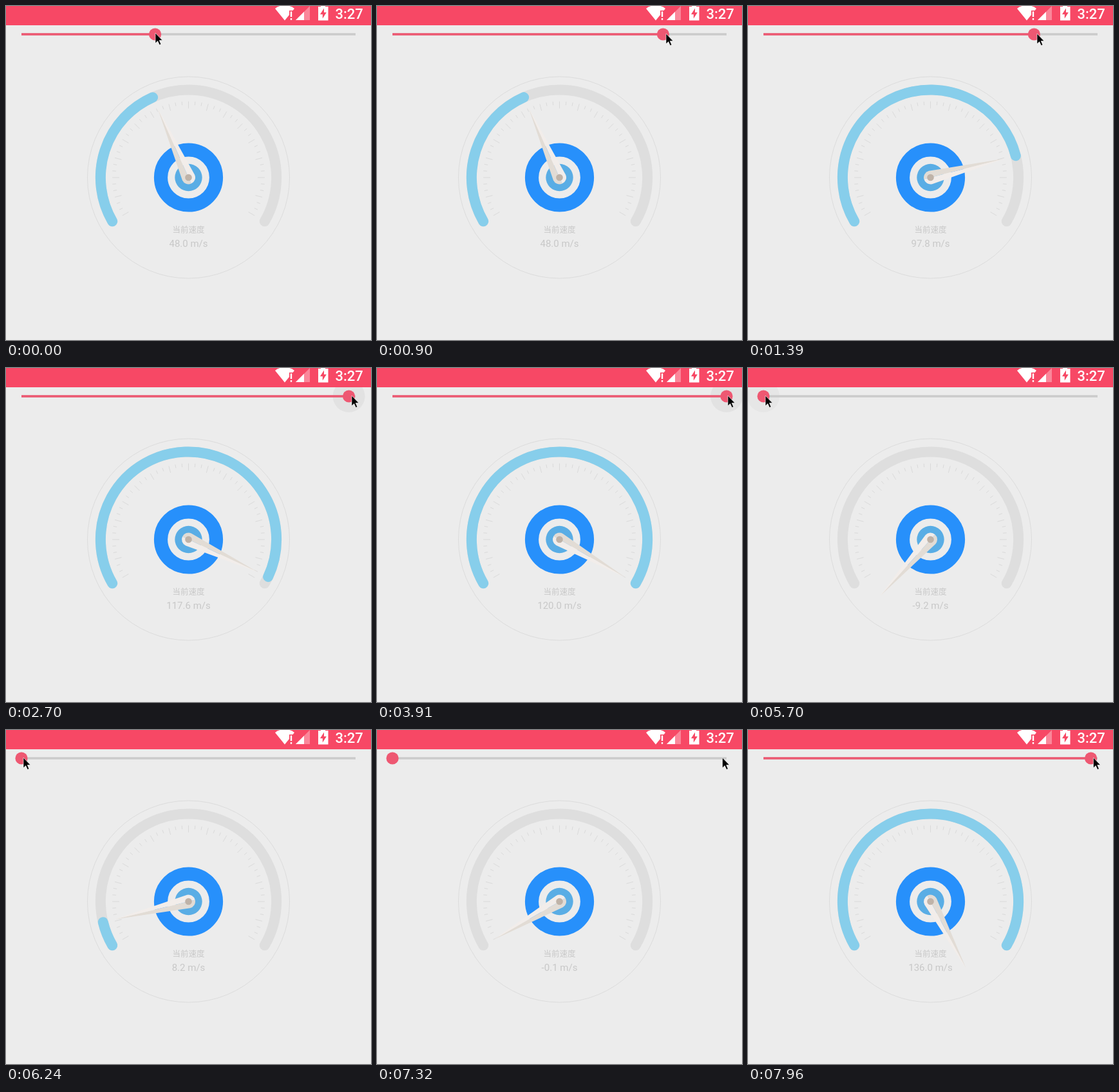
Animation of 567x520 px, one loop 8 s. Source, as an HTML page:

```html
<!DOCTYPE html>
<html lang="zh">
<head>
<meta charset="utf-8">
<title>Speed gauge</title>
<style>
html, body { margin: 0; width: 100%; height: 100%; overflow: hidden; background: #ececec; }
svg { display: block; width: 567px; height: 520px; }
text { font-family: Roboto, "Noto Sans CJK SC", "Noto Sans CJK", sans-serif; }
.label { fill: #c8c8c8; text-anchor: middle; }
.arc { fill: none; stroke-width: 16; stroke-linecap: round; }
</style>
</head>
<body>
<svg viewBox="0 0 567 520">
  <rect width="567" height="520" fill="#ececec"/>

  <circle id="ripple" cy="44" fill="#000"/>
  <path d="M24 44H543" stroke="#cbcbcb" stroke-width="3.4"/>
  <path id="fill" stroke="#ee5872" stroke-width="3.4"/>
  <circle id="thumb" cy="44" r="9.6" fill="#ee5872"/>

  <g transform="translate(283.5 267)">
    <circle r="157" fill="none" stroke="#dcdcdc"/>
    <path id="track" class="arc" stroke="#dedede"/>
    <path id="level" class="arc" stroke="#87ceeb"/>
    <path id="ticks" stroke="#dadada"/>
    <circle r="43" fill="none" stroke="#2790fb" stroke-width="21.2"/>
    <circle r="21.2" fill="#59ade5"/>
    <g id="needle">
      <path d="M118 0L0 -10.5A10.5 10.5 0 0 0 -10.5 0Z" fill="#e2dcd5"/>
      <path d="M118 0L0 10.5A10.5 10.5 0 0 1 -10.5 0Z" fill="#f2edea"/>
    </g>
    <circle r="5.3" fill="#bfb3a8"/>
  </g>
  <text class="label" x="283.5" y="353" font-size="12.5">当前速度</text>
  <text class="label" id="speed" x="283.5" y="375" font-size="15"></text>

  <rect width="567" height="30" fill="#f74865"/>
  <g fill="#fff">
    <path d="M418 4Q424 -1 433 -1T448 4L433 22.5Z"/>
    <path d="M440 7H449V24H440Z" fill="#f74865"/>
    <path d="M441.8 8.5H444.2V17H441.8ZM441.8 19H444.2V21.8H441.8Z"/>
    <path d="M450 22L472 0V22Z" opacity=".35"/>
    <path d="M450 22L463 9V22Z"/>
    <path d="M485 1H489V-2H496V1H500.5V22.5H485Z"/>
    <path d="M494 3.5L488 13H491.8V19.5L497.8 10H494Z" fill="#f74865"/>
    <text x="511.5" y="19.8" font-size="22" font-weight="500">3:27</text>
  </g>
  <path id="cursor" d="M0 0V16L3.7 12.6L6.4 18.6L8.8 17.5L6.2 11.6H11Z" stroke="#fff" stroke-width=".6"/>
</svg>
<script>
const LOOP = 8000, MAX = 120, RADIUS = 136.6;
const $ = id => document.getElementById(id);
const clamp = v => Math.max(0, Math.min(1, v));

// press time, release time, slider position, time the gauge starts moving
const presses = [
  [-430, -300, 0.40, -400],
  [900, 1050, 0.81, 952],
  [2400, 3900, 0.98, 2400],
  [3800, 3900, 1, 3800],
  [5440, 5600, 0, 5480],
  [7460, 7600, 0.98, 7492.5]
];

// time, x, y of the pointer tip
const pointer = [
  [0, 232, 42], [40, 232, 42], [640, 449, 43], [1430, 449, 43], [1700, 532, 43],
  [2000, 541, 43], [2350, 537, 43], [3469, 537, 43], [3470, 539, 43], [3780, 539, 43],
  [3900, 545, 43], [4050, 545, 43], [4600, 92, 58], [4740, 57, 58], [5260, 27, 43],
  [6250, 27, 43], [6800, 556, 43], [7050, 536.5, 43], [LOOP, 536.5, 43]
];

const polar = (r, deg) => {
  const a = deg * Math.PI / 180;
  return `${(r * Math.cos(a)).toFixed(2)} ${(r * Math.sin(a)).toFixed(2)}`;
};

const angleOf = speed => 150 + 2 * speed;

const arc = speed => speed <= 0 ? '' :
  `M${polar(RADIUS, 150)}A${RADIUS} ${RADIUS} 0 ${speed > 90 ? 1 : 0} 1 ${polar(RADIUS, angleOf(speed))}`;

// remaining share of the distance: a damped oscillation
const elastic = p => 2 ** (-10 * p) * Math.cos(5 * Math.PI * p);

function speedAt(t) {
  let speed = 0;
  presses.forEach(([, , pos, start], i) => {
    if (t < start) return;
    const end = i + 1 < presses.length ? Math.min(t, presses[i + 1][3]) : t;
    const gap = speed - pos * MAX;
    const duration = Math.abs(gap) / MAX * 2000;
    speed = pos * MAX + gap * elastic(clamp((end - start) / duration));
  });
  return speed;
}

// monotone cubic through the pointer keys
function pointerAt(t, axis) {
  const slope = i => (pointer[i + 1][axis] - pointer[i][axis]) / (pointer[i + 1][0] - pointer[i][0]);
  const tangent = i => {
    if (i === 0 || i === pointer.length - 1) return 0;
    const a = slope(i - 1), b = slope(i);
    return a * b <= 0 ? 0 : 2 * a * b / (a + b);
  };
  let i = 0;
  while (i < pointer.length - 2 && t >= pointer[i + 1][0]) i++;
  const span = pointer[i + 1][0] - pointer[i][0];
  const u = (t - pointer[i][0]) / span, v = 1 - u;
  return v * v * (1 + 2 * u) * pointer[i][axis] + u * u * (3 - 2 * u) * pointer[i + 1][axis]
    + span * u * v * (v * tangent(i) - u * tangent(i + 1));
}

function render(t) {
  const speed = speedAt(t);
  $('level').setAttribute('d', arc(Math.min(speed, MAX)));
  $('needle').setAttribute('transform', `rotate(${angleOf(speed)})`);
  $('speed').textContent = speed.toFixed(1) + ' m/s';

  const [down, up, pos] = presses.filter(p => p[0] <= t).pop();
  const x = 24 + 519 * pos;
  $('thumb').setAttribute('cx', x);
  $('fill').setAttribute('d', `M24 44H${x}`);
  const grow = pos === 1 ? 1 : clamp((t - down) / 250);
  $('ripple').setAttribute('cx', x);
  $('ripple').setAttribute('r', 25 * grow);
  $('ripple').setAttribute('opacity', 0.045 * (1 - clamp((t - up) / 280)));

  $('cursor').setAttribute('transform', `translate(${pointerAt(t, 1)} ${pointerAt(t, 2)})`);
}

$('track').setAttribute('d', arc(MAX));
$('ticks').setAttribute('d', Array.from({ length: 49 }, (_, i) =>
  `M${polar(i % 3 ? 113 : 107.5, 150 + 5 * i)}L${polar(118.5, 150 + 5 * i)}`).join(''));

const begin = performance.now();
function frame() {
  render((performance.now() - begin) % LOOP);
  requestAnimationFrame(frame);
}
render(0);
requestAnimationFrame(frame);
</script>
</body>
</html>
```
